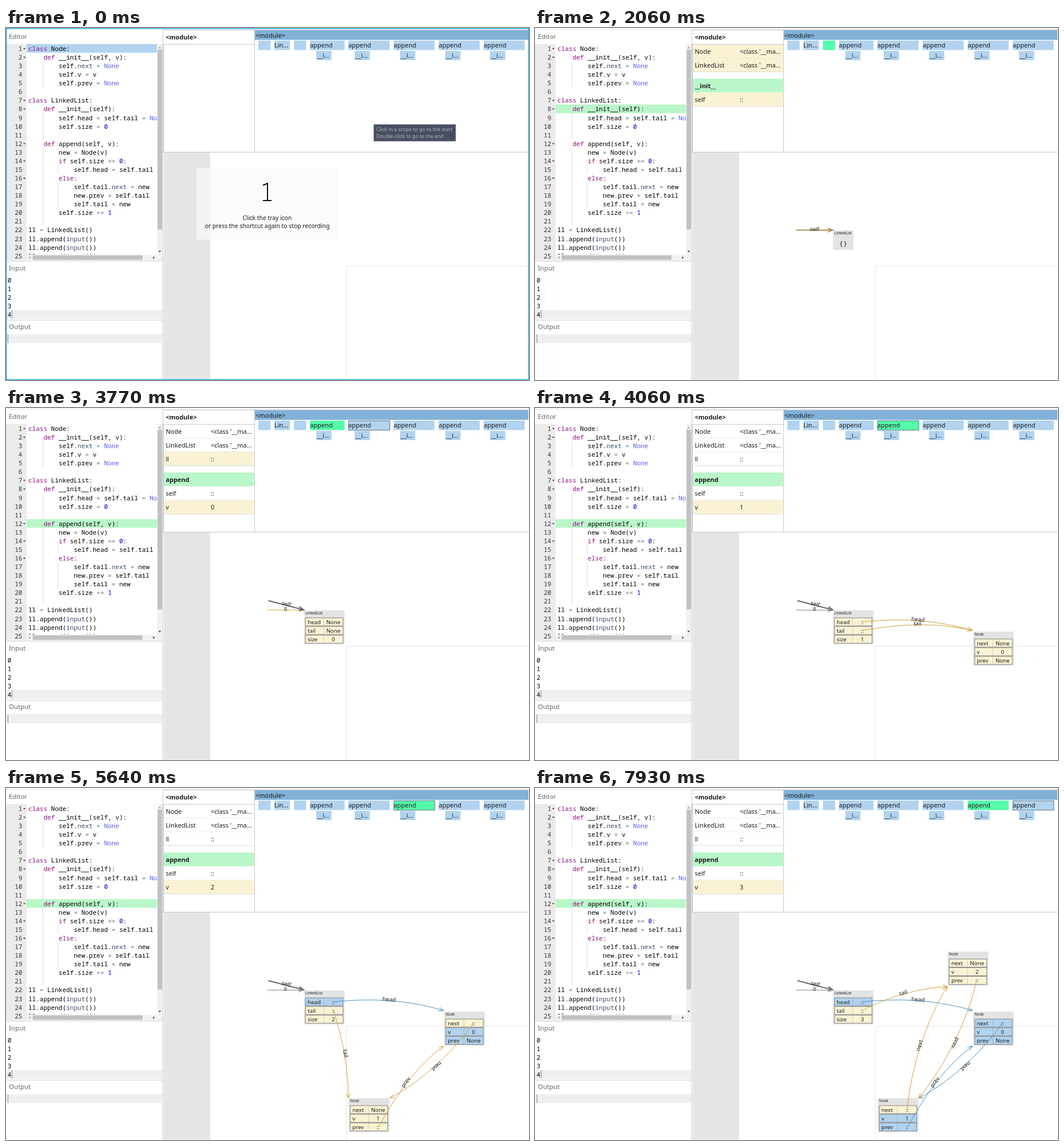
An HTML page that plays this animation: 912x614 px, repeating every 8000 ms.

```html
<!DOCTYPE html>
<html lang="en">
<head>
<meta charset="utf-8">
<style>
  html, body { margin: 0; width: 100%; height: 100%; overflow: hidden; background: #fff; }
  svg { display: block; }
  text { font-family: "Noto Sans", sans-serif; white-space: pre; fill: #1c1c1c; }
  .mono { font-family: "Noto Sans Mono", monospace; fill: #000; }
  .fade { mix-blend-mode: plus-lighter; }
</style>
</head>
<body>
<svg id="stage" width="912" height="614"></svg>
<script>
const LOOP = 8000, LINE = 15.07;
const BLUE = '#b1d3ef', GREEN = '#b9f6c8', YELLOW = '#f9f3d4', LIT = '#55fdab';
const ORANGE = '#d99d3a', STEEL = '#4a90c6', GRAY = '#666';

const CODE = `class Node:
    def __init__(self, v):
        self.next = None
        self.v = v
        self.prev = None

class LinkedList:
    def __init__(self):
        self.head = self.tail = None
        self.size = 0

    def append(self, v):
        new = Node(v)
        if self.size == 0:
            self.head = self.tail = new
        else:
            self.tail.next = new
            new.prev = self.tail
            self.tail = new
        self.size += 1

ll = LinkedList()
ll.append(input())
ll.append(input())
ll.append(input())`.split('\n');

// ---- drawing helpers ----
const rect = (x, y, w, h, fill, more = '') =>
  `<rect x="${x}" y="${y}" width="${w}" height="${h}" fill="${fill}" ${more}/>`;
const path = (d, stroke, width = 1, fill = 'none') =>
  `<path d="${d}" stroke="${stroke}" stroke-width="${width}" fill="${fill}"/>`;
const shape = (d, fill) => path(d, 'none', 0, fill);
const text = (x, y, s, size = 11, more = '') =>
  `<text x="${x}" y="${y}" font-size="${size}" ${more}>${s.replace(/</g, '&lt;')}</text>`;
const mono = (x, y, s, more = '') =>
  `<text class="mono" x="${x}" y="${y}" font-size="11" ${more}>${s}</text>`;
const lineTop = n => 28 + (n - 1) * LINE;

// ---- editor, input and output ----
const tokenColors = [
  [/^(class|def|if|else)$/, '#930f80'], [/^None$/, '#585cf6'], [/^(next|input)$/, '#3c4c72'],
  [/^\d$/, '#0000cd'], [/^\W+$/, '#687687'],
];
const colorize = line => line.replace(/\b(class|def|if|else|None|next|input|\d)\b|[+=]?=/g, s =>
  `<tspan fill="${tokenColors.find(([re]) => re.test(s))[1]}">${s}</tspan>`);

const guides = [[4, 3, 5], [4, 9, 11], [4, 13, 21], [8, 15, 15], [8, 17, 19]].map(([col, a, b]) =>
  path(`M${39 + col * 6.6 - .9} ${lineTop(a)}V${lineTop(b + 1)}`, '#dedede')).join('');

const codeText = `<clipPath id="codeArea"><rect x="36" y="28" width="227.5" height="367"/></clipPath>
  <g clip-path="url(#codeArea)">${guides}${CODE.map((s, i) => mono(39, 40 + i * LINE, colorize(s))).join('')}</g>`;

const gutter = rect(0, 28, 36, 377, '#ebebeb') + CODE.map((s, i) => {
  const y = 40 + i * LINE;
  return mono(28.4, y, i + 1, 'text-anchor="end" style="fill:#333"') +
    (s.endsWith(':') ? shape(`M29.8 ${y - 5}h4.4l-2.2 2.6z`, '#444') : '');
}).join('');

const scrollbars = rect(263.5, 28, 9.5, 367, '#f1f1f1') + rect(264.3, 38, 8, 313.5, '#c1c1c1') +
  rect(36, 395.5, 227.5, 9.5, '#f1f1f1') + rect(46.5, 396.5, 191.5, 8, '#c1c1c1') +
  rect(263.5, 395, 9.5, 10, '#f1f1f1') +
  shape('M265.5 35.5h5l-2.5-3zM42.5 398v5l-3-2.5z', '#a3a3a3') +
  shape('M265.5 388.5h5l-2.5 3zM256.5 398v5l3-2.5z', '#505050');

const heading = (y, s) => text(5, y, s, 11.4, 'style="fill:#666"');
const inputOutput = heading(19, 'Editor') + heading(422.5, 'Input') + heading(525, 'Output') +
  rect(0, 492, 273, 15.2, '#efefef') + rect(0, 534.3, 273, 15.2, '#efefef') +
  [0, 1, 2, 3, 4].map(n => mono(2.7, 443.5 + n * LINE, n)).join('') +
  path('M10.5 492v15M3.5 534.5v15', '#888') + path('M0 406.5H273M0 509.5H273', '#ccc');

const frameLines = path('M0 2H912', '#dde5eb') + path('M273.5 3V614', '#ccc') +
  path('M274 3.5H912M433.5 3V216.5M274 216.5H912M274 28.5H433', '#c8c8c8') +
  path('M274.7 28V216', '#a9c4de') + rect(275, 217, 81, 396.5, '#e5e5e5') +
  path('M593.5 614V415.5H912', '#e4e4e4');

// ---- call chart ----
const calls = [[440, 21.5], [468, 27, 'Lin…'], [502, 21.5], [530, 60.5, 'append'], [597, 72, 'append'],
  [676, 71.5, 'append'], [754.5, 71.5, 'append'], [833, 71.5, 'append']];
const hovers = [[2, 870, 2060], [3, 2130, 3310], [4, 3470, 4570], [5, 4670, 6210], [6, 6280, 7850], [7, 7930, 8000]];

function callChart(active, t) {
  const hover = hovers.find(([, from, to]) => t >= from && t < to);
  return rect(434, 4, 477, 16.7, '#81b1d8') + text(435, 17, '<module>') +
    calls.map(([x, w, name = ''], i) => rect(x, 22, w, 16.5, i === active ? LIT : BLUE) +
      (hover && hover[0] === i ? path(`M${x + .3} 22.3h${w}v16.4h${-w}z`, '#5b7388') : '') +
      text(x, 34, name)).join('') +
    [541, 608, 687, 766, 844].map(x => rect(x, 40, 26.7, 16, BLUE) + text(x + 1.5, 52, '__i…')).join('');
}

function tooltip(x, y, w, h, lines) {
  return rect(x + .5, y + .5, w - 1, h - 1, '#474f5f', 'stroke="#6b7484"') +
    lines.map((s, i) => text(x + 4.7, y + 11.8 + i * 12, s, 8.7, 'style="fill:#b0b4bc"')).join('');
}

// ---- variables: rows are [name, value, changed] ----
function scopes(list) {
  let y = 4;
  return list.map(([name, rows], i) => {
    const head = rect(275, y, 157.5, 24, i ? GREEN : '#fff') + text(278.5, y + 16.3, name, 11, 'font-weight="700"');
    y += 24.5;
    const body = rows.map(([key, value, changed]) => {
      const row = rect(275, y, 157.5, 24, changed ? YELLOW : '#fff') +
        path(`M275 ${y + 24}h158`, '#dcdcdc') + text(278.5, y + 16.4, key) + text(357, y + 16.4, value);
      y += 24;
      return row;
    }).join('');
    y += 12;
    return head + body;
  }).join('');
}

// ---- object graph ----
const box = (x, y, w, h, title) => rect(x, y, w, h, '#e3e3e3', 'rx="2"') + text(x + 2.5, y + 7, title, 6.35);

function node(x, y, title, rows) {
  return box(x, y, 71, 59.5, title) + rows.map(([key, value, changed], i) => {
    const top = y + 13 + i * 15.1;
    return rect(x + 2.8, top, 65.4, 14, changed ? YELLOW : BLUE, 'stroke="#858585"') +
      path(`M${x + 34.5} ${top + 1}v12`, 'rgba(0,0,0,.14)') +
      text(x + 6.5, top + 10.6, key, 9.7) + text(x + 51.3, top + 10.6, value, 9.7, 'text-anchor="middle"');
  }).join('');
}

const routes = {
  ll: [455.5, 352.5, 519, 352.5],
  self: [457.5, 336, 519, 352],
  head: [571, 373, 640, 366, 700, 370, 763, 388],
  tail0: [571, 388, 640, 376, 700, 374, 763, 388],
  tail1: [571, 388, 587, 438, 597, 490, 597, 541],
  tail2: [571, 388, 615, 364, 668, 350, 719, 346],
  next0: [815, 410, 785, 454, 726, 512, 669, 541],
  prev1: [650, 591, 675, 545, 710, 490, 763, 450],
  next1: [649, 561, 655, 492, 682, 405, 719, 346],
  prev2: [770, 335, 755, 405, 715, 485, 669, 541],
};
let edgeCount = 0;
function edge(route, color, width = 1, label = route.replace(/\d/, '')) {
  const p = routes[route], [cx, cy, x, y] = p.slice(-4), id = 'edge' + edgeCount++;
  const angle = Math.atan2(y - cy, x - cx);
  const barb = turn => `${x - 9 * Math.cos(angle + turn)} ${y - 9 * Math.sin(angle + turn)}`;
  const d = `M${p[0]} ${p[1]}${p.length > 4 ? 'C' : 'L'}${p.slice(2).join(' ')}`;
  return `<path id="${id}" d="${d}" fill="none" stroke="${color}" stroke-width="${width}"/>` +
    path(`M${barb(.38)}L${x} ${y}L${barb(-.38)}`, color, width) +
    `<text font-size="9.7" dy="1" text-anchor="middle"><textPath href="#${id}" startOffset="50%">${label}</textPath></text>`;
}

const linkedList = (head, tail, size, headChanged) =>
  node(519.5, 353, 'LinkedList', [['head', head, headChanged], ['tail', tail, 1], ['size', size, 1]]);
const listNode = (x, y, next, v, prev, changed) =>
  node(x, y, 'Node', [['next', next, changed[0]], ['v', v, changed[1]], ['prev', prev, changed[2]]]);
const pointers = edge('self', GRAY, 2) + edge('ll', '#858585');

const graphs = [
  '',
  box(519.5, 353, 36, 34, 'LinkedList') + text(537.5, 380, '{ }', 11.5, 'text-anchor="middle"') +
    edge('ll', '#b08d57', 2, 'self'),
  linkedList('None', 'None', '0', 1) + edge('ll', '#e8a53f') + edge('self', GRAY, 2),
  linkedList('::', '::', '1', 1) + listNode(764, 390, 'None', '0', 'None', [1, 1, 1]) +
    pointers + edge('head', ORANGE) + edge('tail0', ORANGE),
  linkedList('::', '::', '2') + listNode(764, 390, '::', '0', 'None', [1]) +
    listNode(597.5, 541, 'None', '1', '::', [1, 1, 1]) + pointers + edge('head', STEEL) +
    edge('tail1', ORANGE) + edge('next0', ORANGE) + edge('prev1', ORANGE),
  linkedList('::', '::', '3') + listNode(764, 390, '::', '0', 'None', []) +
    listNode(597.5, 541, '::', '1', '::', [1]) + listNode(719.5, 285.3, 'None', '2', '::', [1, 1, 1]) +
    pointers + edge('head', STEEL) + edge('tail2', ORANGE) + edge('next0', STEEL) +
    edge('prev1', STEEL) + edge('next1', ORANGE) + edge('prev2', ORANGE),
];

// ---- steps of the debugged program ----
const globals = changed => [['Node', "<class '__ma…", changed], ['LinkedList', "<class '__ma…", changed]];
const appendScopes = (v, first) => [
  ['<module>', [...globals(0), ['ll', '::', first]]],
  ['append', [['self', '::', 0], ['v', v, 1]]],
];
const steps = [
  { start: 0, end: 0, line: 1, color: BLUE, call: -1, scopes: [['<module>', []]] },
  { start: 1060, end: 1430, line: 8, color: GREEN, call: 2,
    scopes: [['<module>', globals(1)], ['__init__', [['self', '::', 1]]]] },
  { start: 2610, end: 3050, line: 12, color: GREEN, call: 3, scopes: appendScopes('0', 1) },
  { start: 3830, end: 4060, line: 12, color: GREEN, call: 4, scopes: appendScopes('1', 0) },
  { start: 5240, end: 5640, line: 12, color: GREEN, call: 5, scopes: appendScopes('2', 0) },
  { start: 6780, end: 7190, line: 12, color: GREEN, call: 6, scopes: appendScopes('3', 0) },
];

const countdown = rect(332, 244, 248, 125, 'rgba(250,250,250,.7)', 'rx="3"') +
  path('M448 274.5L456 271V301M448 301H463', '#111', 2) +
  text(455.5, 335, 'Click the tray icon', 10.35, 'text-anchor="middle"') +
  text(455.5, 349, 'or press the shortcut again to stop recording', 10.35, 'text-anchor="middle"') +
  rect(.75, .75, 910.5, 612.5, 'none', 'stroke="#2fb0ee" stroke-width="1.5"');

const layer = (content, opacity) => `<g class="fade" opacity="${opacity.toFixed(3)}">${content}</g>`;

function scene(t) {
  const index = steps.findLastIndex(s => t >= s.start), step = steps[index];
  const mix = index ? Math.min(1, (t - step.start) / (step.end - step.start)) : 1;
  const graph = mix < 1
    ? `<g style="isolation:isolate">${layer(graphs[index - 1], 1 - mix)}${layer(graphs[index], mix)}</g>`
    : graphs[index];
  return gutter + rect(36, lineTop(step.line), 227.5, 15.1, step.color) + codeText + scrollbars +
    inputOutput + scopes(step.scopes) + frameLines + callChart(step.call, t) + graph +
    (t < 750 ? tooltip(641, 168, 143.5, 29.7, ['Click in a scope to go to the start', 'Double-click to go to the end']) : '') +
    (t >= 5180 && t < 5240 ? tooltip(694.7, 40, 41.5, 17.7, ['append']) : '') +
    (t < 70 ? countdown : '');
}

const stage = document.getElementById('stage');
let shown, origin;
function tick(now) {
  origin ??= now;
  const next = scene((now - origin) % LOOP);
  if (next !== shown) stage.innerHTML = shown = next;
  requestAnimationFrame(tick);
}
requestAnimationFrame(tick);
</script>
</body>
</html>
```
